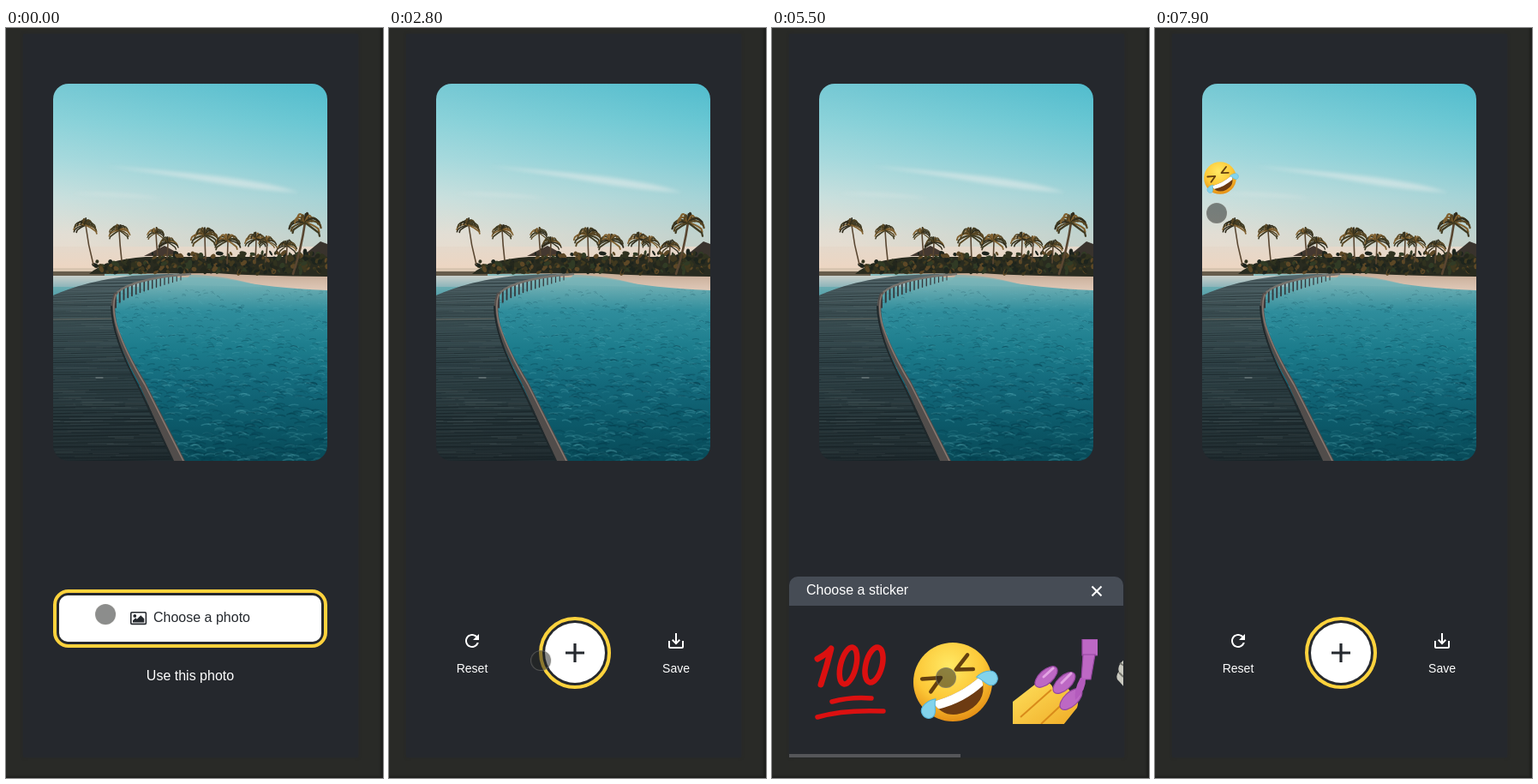
An HTML page with a canvas for the animation above (8000 ms loop, 440 by 875 pixels).

```html
<!DOCTYPE html>
<html lang="en">
<head>
<meta charset="utf-8">
<title>Sticker picker</title>
<style>
html, body { margin: 0; width: 100%; height: 100%; overflow: hidden; background: #292a27; }
body { position: relative; font: 16px/18px "Liberation Sans", Arial, sans-serif; color: #fff; }
body::after { content: ""; position: absolute; inset: 0; box-shadow: inset -3px -2px 2px #1f201e; }
.abs, .phone, .sheet, .bar, .ring, .ring i, canvas, svg, p { position: absolute; }
p { margin: 0; white-space: nowrap; }
svg { overflow: visible; }
.phone { left: 20px; top: 7px; width: 391px; height: 844px; background: #25282d; box-shadow: 0 0 3px #25282d; }
.clip { position: absolute; left: 20px; top: 7px; width: 390px; height: 844px; overflow: hidden; }
canvas { left: 55px; top: 65px; border-radius: 18px; }

.ring { box-sizing: border-box; border: 4px solid #ffd33d; }
.ring i { inset: 3px; background: #fff; border-radius: inherit; }
.wide { left: 55px; top: 655px; width: 320px; height: 68px; border-radius: 18px; }
.wide i { border-radius: 10px; }
.round { left: 175px; top: 687px; width: 84px; height: 84px; border-radius: 50%; }
.mid { transform: translateX(-50%); }
.small { font-size: 14px; line-height: 16px; }

.pick { animation: pick 8s step-end infinite; }
.tools { animation: tools 8s step-end infinite; }
.sticker { animation: sticker 8s step-end infinite; }
@keyframes pick { 0% { visibility: visible } 21.25%, 100% { visibility: hidden } }
@keyframes tools { 0% { visibility: hidden } 21.25%, 100% { visibility: visible } }
@keyframes sticker { 0% { visibility: hidden } 73.66%, 100% { visibility: visible } }

.sheet { left: 0; top: 633px; width: 390px; height: 211px; background: #25282d; border-radius: 10px 10px 0 0; animation: slide 8s infinite; }
.bar { width: 390px; height: 34px; background: #464c55; border-radius: 10px 10px 0 0; }
.scroll { position: absolute; left: 0; bottom: 0; width: 200px; height: 4px; background: #555659; }
@keyframes slide {
  0%, 43.5% { transform: translateY(844px); animation-timing-function: ease-in }
  47.25% { transform: none }
  73.66% { transform: none; animation-timing-function: ease-in }
  77.41%, 100% { transform: translateY(844px) }
}

.touch { position: absolute; left: -12px; top: -12px; width: 22px; height: 22px; border-radius: 50%;
  background: rgba(35,38,35,.52); border: 1px solid rgba(135,135,130,.5); animation: touch 8s linear infinite; }
@keyframes touch {
  0% { transform: translate(116px,684px) }
  10% { transform: translate(201px,725px) }
  13.75% { transform: translate(200px,752px) }
  17.5%, 29% { transform: translate(193px,758px) }
  35% { transform: translate(177px,738px); animation-timing-function: ease-out }
  41.25%, 44% { transform: translate(214px,731px) }
  48.75% { transform: translate(193px,731px); opacity: 1 }
  53% { transform: translate(200px,742px); opacity: 1 }
  57.5%, 65% { transform: translate(203px,746px); opacity: .15 }
  67%, 71.25% { transform: translate(203px,758px); opacity: 1 }
  75% { transform: translate(199px,738px) }
  76.25%, 78.7% { transform: translate(188px,704px); opacity: 1 }
  78.71% { transform: translate(188px,704px); opacity: 0 }
  88.74% { transform: translate(130px,527px); opacity: 0 }
  88.75% { transform: translate(130px,527px); opacity: 1; animation-timing-function: ease-out }
  98.75%, 100% { transform: translate(72px,216px); opacity: 1 }
}
</style>
</head>
<body>
<svg width="0" height="0">
  <defs>
    <radialGradient id="skin" cx=".45" cy=".3" r=".72">
      <stop offset="0" stop-color="#ffe965"/><stop offset=".6" stop-color="#fcc736"/><stop offset="1" stop-color="#e38b13"/>
    </radialGradient>
    <linearGradient id="finger" x2="1" y2="1">
      <stop offset="0" stop-color="#ffe25e"/><stop offset="1" stop-color="#efa823"/>
    </linearGradient>
    <clipPath id="mouth"><path id="lips" d="M-32 9Q0 17 32 9Q29 37 0 38Q-29 37-32 9Z"/></clipPath>
    <path id="tear" d="M27 8C35 5 48 7 49 15C50 24 41 28 36 23C32 19 32 13 27 8Z" fill="#83d3ec" stroke="#55b3d8"/>
    <g id="laugh">
      <circle r="46" fill="url(#skin)"/>
      <g transform="rotate(-28)">
        <path d="M-30-20L-10-11L-28-2M30-20L10-11L28-2" fill="none" stroke="#65400f" stroke-width="4.5" stroke-linecap="round" stroke-linejoin="round"/>
        <use href="#lips" fill="#6d3b12"/>
        <path d="M-34 6Q0 14 34 6L30 20Q0 28-30 20Z" fill="#fff" clip-path="url(#mouth)"/>
        <use href="#tear"/><use href="#tear" transform="scale(-1 1)"/>
      </g>
    </g>
  </defs>
</svg>

<div class="phone"></div>
<canvas id="photo" width="320" height="440"></canvas>
<svg class="sticker" width="1" height="1" style="left:0;top:0"><use href="#laugh" transform="translate(76 175) scale(.41)"/></svg>

<div class="pick">
  <div class="ring wide"><i></i></div>
  <svg width="20" height="16" style="left:145px;top:681px">
    <rect x=".8" y=".8" width="17.6" height="13.6" rx="1.2" fill="none" stroke="#25292e" stroke-width="1.6"/>
    <circle cx="5.3" cy="4.9" r="1.9" fill="#25292e"/>
    <path d="M3 12.6V10.3L6.2 7.2L7.8 8.8L12.3 4.2L16.3 8.2V12.6Z" fill="#25292e"/>
  </svg>
  <p style="left:172px;top:679px;color:#25292e">Choose a photo</p>
  <p class="mid" style="left:215px;top:747px">Use this photo</p>
</div>

<div class="tools">
  <svg width="24" height="24" style="left:85px;top:703px" fill="#fff"><path d="M17.65 6.35C16.2 4.9 14.21 4 12 4c-4.42 0-7.99 3.58-7.99 8s3.57 8 7.99 8c3.73 0 6.84-2.55 7.73-6h-2.08c-.82 2.33-3.04 4-5.65 4-3.31 0-6-2.69-6-6s2.69-6 6-6c1.66 0 3.14.69 4.22 1.78L13 11h7V4z"/></svg>
  <p class="mid small" style="left:97px;top:739px">Reset</p>
  <div class="ring round"><i></i></div>
  <svg width="24" height="24" style="left:205px;top:717px"><path d="M1 12H23M12 1V23" stroke="#25292e" stroke-width="3.2"/></svg>
  <svg width="24" height="24" style="left:323px;top:703px" fill="#fff"><path d="M19 12v7H5v-7H3v7c0 1.1.9 2 2 2h14c1.1 0 2-.9 2-2v-7h-2zm-6 .67l2.59-2.58L17 11.5l-5 5-5-5 1.41-1.41L11 12.67V3h2z"/></svg>
  <p class="mid small" style="left:335px;top:739px">Save</p>
</div>

<div class="clip">
  <div class="sheet">
    <div class="bar"></div>
    <p style="left:20px;top:7px">Choose a sticker</p>
    <svg width="390" height="211" viewBox="20 640 390 211" style="left:0;top:0;overflow:hidden">
      <path d="M373.5 651.5L384.5 662.5M384.5 651.5L373.5 662.5" stroke="#fff" stroke-width="2.1"/>
      <g fill="none" stroke="#db1010" stroke-linecap="round" stroke-linejoin="round">
        <path d="M53 736Q63 731 69 724Q64 745 57 766" stroke-width="7"/>
        <ellipse cx="89" cy="744" rx="9" ry="22" transform="rotate(14 89 744)" stroke-width="6.5"/>
        <ellipse cx="119" cy="743" rx="9.5" ry="21" transform="rotate(14 119 743)" stroke-width="6.5"/>
        <path d="M70 786Q92 780 116 782M53 804Q83 795 130 797" stroke-width="5.5"/>
      </g>
      <use href="#laugh" transform="translate(211 763)"/>
      <svg x="281" y="713" width="99" height="99" viewBox="281 713 99 99" style="overflow:hidden">
        <path d="M276 790L308 765Q322 757 328 770Q345 763 350 778Q360 781 356 793L336 818H276Z" fill="url(#finger)"/>
        <path d="M290 804L326 772M314 812L347 781" stroke="#d98b1a" stroke-width="2" fill="none"/>
        <g fill="#bd68c4" stroke="#94469f" stroke-width="1.2">
          <ellipse cx="320" cy="757" rx="16" ry="8" transform="rotate(-42 320 757)"/>
          <ellipse cx="341" cy="764" rx="16" ry="8" transform="rotate(-43 341 764)"/>
          <ellipse cx="349" cy="783" rx="16" ry="8" transform="rotate(-43 349 783)"/>
          <path d="M362 713H381V732H362Z"/><path d="M363 731H377L372 760H361Z"/>
        </g>
        <path d="M317 757L328 747M338 764L349 753" stroke="#e3a4e4" stroke-width="3" stroke-linecap="round"/>
        <path d="M366 759Q367 772 354 784Q352 772 360 758Z" fill="#b45bbd"/>
      </svg>
      <path d="M412 736Q402 744 405 751Q401 754 403 760Q407 764 412 770Z" fill="#c9c9bf"/>
      <path d="M405 752L410 757M406 741L411 744" stroke="#77776f" stroke-width="2"/>
    </svg>
    <div class="scroll"></div>
  </div>
</div>
<div class="touch"></div>

<script>
const g = document.getElementById('photo').getContext('2d');
let seed = 11;
const rnd = () => (seed = seed * 16807 % 2147483647) / 2147483647;
const span = (a, b) => a + (b - a) * rnd();
const pick = list => list[Math.floor(rnd() * list.length)];

function ramp(y0, y1, ...colors) {
  const fill = g.createLinearGradient(0, y0, 0, y1);
  colors.forEach((c, i) => fill.addColorStop(i / (colors.length - 1), c));
  return fill;
}
function shape(d, fill) { g.fillStyle = fill; g.fill(new Path2D(d)); }
function line(d, color, width) {
  g.strokeStyle = color; g.lineWidth = width; g.stroke(new Path2D(d));
}

function sky() {
  g.fillStyle = ramp(0, 220, '#5cc1d1', '#76cdd8', '#96d5dc', '#bfdcdc', '#e0dad0', '#eed5c0');
  g.fillRect(0, 0, 320, 225);
  const side = g.createLinearGradient(0, 120, 320, 0);
  side.addColorStop(0, 'rgba(235,235,225,.22)');
  side.addColorStop(1, 'rgba(40,170,190,.22)');
  g.fillStyle = side;
  g.fillRect(0, 0, 320, 190);
  g.save();
  g.filter = 'blur(2px)';
  shape('M60 96Q150 103 200 109T288 127Q235 124 185 115T60 96Z', 'rgba(240,240,238,.5)');
  shape('M20 128Q80 125 130 134Q80 132 20 128Z', 'rgba(240,238,235,.3)');
  g.restore();
}

function water() {
  g.fillStyle = ramp(222, 440, '#8bbdbd', '#2f8d9c', '#1c7c8c', '#13687a', '#0c5969', '#084a58');
  g.fillRect(0, 222, 320, 218);
  for (let i = 0; i < 1300; i++) {
    const d = rnd(), y = 238 + d * 202, x = span(60, 320), w = span(2, 5) + d * 9;
    const color = rnd() < .5 ? `rgba(100,185,195,${span(.06, .28)})` : `rgba(0,50,66,${span(.1, .34)})`;
    line(`M${x} ${y}q${w / 2} ${-1 - d * 2} ${w} ${span(-1, 2)}`, color, .7 + d * 1.1);
  }
}

function palm(x, y, bx, by, r) {
  line(`M${x} ${y}Q${x + (bx - x) * .3} ${(y + by) / 2} ${bx} ${by}`, '#594631', r > 15 ? 2.6 : 1.6);
  for (let i = 0; i < 15; i++) {
    const a = Math.PI * (.86 + i / 14 * 1.28) + span(-.1, .1), l = r * span(.8, 1.05);
    const ex = x + Math.cos(a) * l, ey = y + Math.sin(a) * l * .72 + l * .3;
    const color = pick(['#302c1c', '#3f3a22', '#574522', '#80602f']);
    line(`M${x} ${y}Q${x + Math.cos(a) * l * .6} ${y + Math.sin(a) * l * .9 - 1} ${ex} ${ey}l${Math.cos(a)} ${r * .2}`, color, r / 8);
  }
}

function shore() {
  shape('M0 215H60V222H0Z', '#d9c6b1');
  shape('M0 219H60V224H0Z', '#665c4b');
  shape('M0 224H100V237H0Z', ramp(224, 237, '#c9cfca', '#8db5ba'));
  shape('M145 221H320V241Q250 238 215 230Q180 225 145 226Z', ramp(222, 241, '#c7ad98', '#e0c9b8'));
  shape('M160 223Q200 223 245 237L150 235Z', 'rgba(120,180,184,.7)');
  shape('M106 201L130 189L152 201Z', '#443830');
  shape('M290 202L312 184L320 187V204Z', '#39332d');
  shape('M42 222Q60 205 108 202H320V225Q230 224 190 221Z', '#292b1f');
  for (let i = 0; i < 330; i++) {
    const x = span(46, 320), top = x < 110 ? 207 : 197;
    g.fillStyle = pick(['#24271c', '#30321f', '#40391f', '#5d4826', '#1d241d', '#313b25']);
    g.beginPath();
    g.ellipse(x, span(top, 220), span(1.5, 4.5), span(1, 3), span(0, 3), 0, 7);
    g.fill();
  }
  [[38, 165, 47, 211, 13], [77, 171, 80, 206, 12], [120, 174, 122, 200, 10], [134, 185, 133, 203, 11],
   [177, 177, 178, 206, 15], [204, 183, 203, 210, 14], [237, 181, 236, 206, 12], [250, 184, 248, 208, 10],
   [273, 189, 272, 209, 11], [294, 162, 280, 222, 18]].forEach(p => palm(...p));
}

function pier() {
  const deck = 'M0 247Q38 230 92 224L152 221Q104 228 80 240Q65 250 69 274Q74 304 96 345L146 440H0Z';
  shape(deck, ramp(222, 440, '#56696d', '#405559', '#2f4247', '#28383c', '#202b2f'));
  g.save();
  g.clip(new Path2D(deck));
  for (let y = 228; y < 440; y += 1.2 + (y - 225) / 65) {
    line(`M0 ${y + 2}L160 ${y + span(-2, 2)}`, `rgba(10,18,21,${span(.15, .5)})`, .8 + (y - 225) / 250);
  }
  for (let i = 0; i < 120; i++) {
    const y = span(250, 440), x = span(-20, 130);
    line(`M${x} ${y}h${span(12, 50)}`, `rgba(115,130,130,${span(.05, .2)})`, 1);
  }
  line('M0 275L72 274', 'rgba(125,125,115,.5)', 1.5);
  line('M50 343h8', 'rgba(160,170,170,.5)', 1.3);
  g.restore();
  for (let i = 0; i < 17; i++) {
    const u = i / 16, x = 73 + 76 * u;
    line(`M${x} ${246 - 23 * Math.sqrt(u)}v${15 - 9 * u}`, '#34363a', 2 - u);
  }
  line('M160 222Q105 226 81 239Q70 245 69 258', '#77736d', 2.4);
  shape('M71 244Q65 258 70 278Q76 306 99 347L140 440H154L107 347Q80 303 74 278Q70 258 75 243Z', '#514d4b');
  line('M73 246Q68 260 74 282Q84 313 107 351L152 440', '#8a7970', 1.5);
  line('M68 260Q69 296 99 352L140 440', '#1f282b', 2);
}

g.lineCap = 'round';
sky();
water();
shore();
pier();
</script>
</body>
</html>
```
